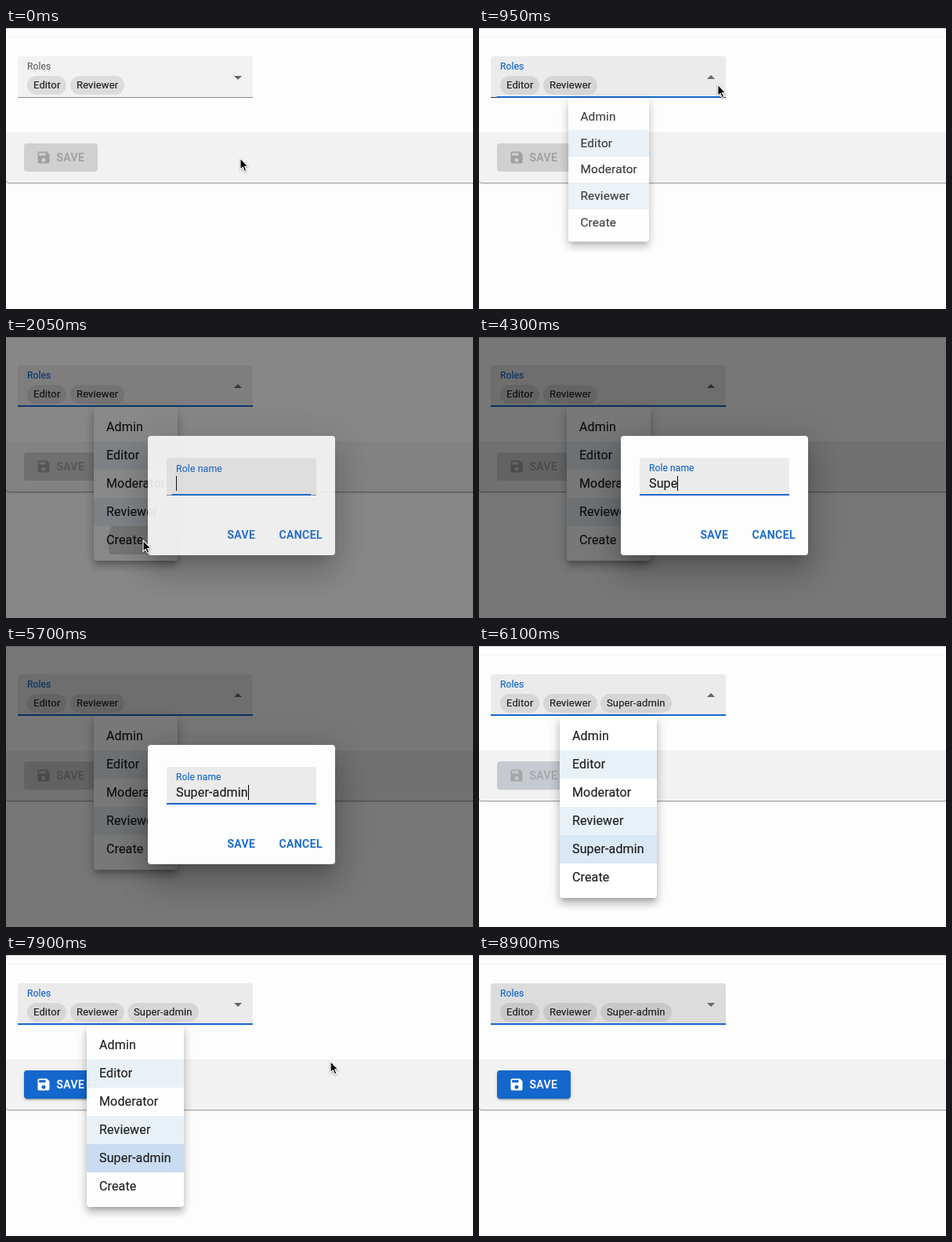
An HTML page for the animation above (9550 ms loop, 596 by 358 pixels).

```html
<!DOCTYPE html>
<html lang="en">
<head>
<meta charset="utf-8">
<title>Roles form</title>
<style>
  html, body { margin: 0; width: 100%; height: 100%; overflow: hidden; background: #fdfdfd; }
  body { font: 16px Roboto, sans-serif; color: #202020; cursor: default; }
  #stage { position: absolute; left: 0; top: 0; width: 596px; height: 358px; overflow: hidden; background: #fdfdfd;
    --blue: #1467cc; -webkit-text-stroke: .2px; }
  #stage div, #stage svg { position: absolute; box-sizing: border-box; white-space: nowrap; }
  .t { line-height: 20px; height: 20px; }
  .small { font-size: 12px; letter-spacing: .11px; }
  .btn { font-size: 14px; font-weight: 500; letter-spacing: .4px; }
  #topline { left: 0; top: 0; width: 596px; height: 1px; background: #d2d2d2; }
  #faint { left: 0; top: 11px; width: 596px; height: 1px; background: #f5f5f5; }
  #footer { left: 0; top: 133px; width: 610px; height: 64px; background: #f2f2f2; border-radius: 0 0 0 4px;
    box-shadow: 0 1px 0 #a2a2a2, 0 2px 2px rgba(0,0,0,.1); }
  #select { left: 15px; top: 36px; width: 300px; height: 53px; border-radius: 4px 4px 0 0; }
  #rule { left: 0; top: 52px; width: 300px; height: 1px; }
  #focusRule { left: 0; top: 51px; width: 300px; height: 2px; background: var(--blue); }
  #stage .chip { top: 25px; height: 24px; border-radius: 12px; background: rgba(0,0,0,.09); padding: 0 8px;
    font-size: 13px; line-height: 24px; letter-spacing: .12px; }
  #arrow { left: 269px; top: 15px; width: 24px; height: 24px; fill: #666; }
  #save { left: 23px; top: 147px; width: 94px; height: 36px; border-radius: 4px; }
  #save svg { left: 15px; top: 8px; width: 20px; height: 20px; fill: currentColor; }
  #save .t { left: 41.5px; top: 8px; }
  #menu { top: 89px; padding: 8px 0; border-radius: 4px; background: #fff; transform-origin: 50% 0;
    box-shadow: 0 5px 5px -3px rgba(0,0,0,.2), 0 8px 10px 1px rgba(0,0,0,.14), 0 3px 14px 2px rgba(0,0,0,.12); }
  #stage #menu .row { position: relative; height: 36px; line-height: 36px; padding-left: 16px; letter-spacing: .15px; overflow: hidden; }
  #menu .on { background: #e9f1f8; }
  #ripple { border-radius: 50%; background: #000; }
  #shade { left: 0; top: 0; width: 596px; height: 358px; background: rgba(0,0,0,.53); }
  #dialog { left: 181px; top: 126px; width: 239px; height: 152px; border-radius: 4px; background: #fdfdfd;
    box-shadow: 0 11px 15px -7px rgba(0,0,0,.2), 0 24px 38px 3px rgba(0,0,0,.14), 0 9px 46px 8px rgba(0,0,0,.12); }
  #field { left: 24px; top: 28px; width: 191px; height: 48px; border-radius: 4px 4px 0 0; background: #ebebeb; }
  #fieldRule { left: 0; top: 47px; width: 191px; height: 1px; background: #8a8a8a; }
  #fieldFocus { left: 0; top: 46px; width: 191px; height: 2px; background: var(--blue); }
  #name { left: 12px; letter-spacing: .15px; transform-origin: 0 50%; }
  #typed { left: 12px; top: 23px; letter-spacing: .15px; }
  #caret { top: 23px; width: 1px; height: 19px; background: #000; }
  #dialog .btn { top: 116px; color: var(--blue); }
  #cursor { left: 0; top: 0; width: 20px; height: 24px; overflow: visible; filter: drop-shadow(0 1px 1px rgba(0,0,0,.35)); }
</style>
</head>
<body>
<div id="stage">
  <div id="topline"></div>
  <div id="faint"></div>
  <div id="footer"></div>
  <div id="select">
    <div id="label" class="t small" style="left:12px;top:3px">Roles</div>
    <div class="chip" style="left:12px">Editor</div>
    <div class="chip" style="left:67px">Reviewer</div>
    <div class="chip" id="newChip" style="left:140px">Super-admin</div>
    <svg id="arrow" viewBox="0 0 24 24"><path d="M7 10l5 5 5-5z"/></svg>
    <div id="rule"></div>
    <div id="focusRule"></div>
  </div>
  <div id="save">
    <svg viewBox="0 0 24 24"><path d="M17 3H5c-1.11 0-2 .9-2 2v14c0 1.1.89 2 2 2h14c1.1 0 2-.9 2-2V7l-4-4zm-5 16c-1.66 0-3-1.34-3-3s1.34-3 3-3 3 1.34 3 3-1.34 3-3 3zm3-10H5V5h10v4z"/></svg>
    <div class="t btn">SAVE</div>
  </div>
  <div id="menu">
    <div class="row">Admin</div>
    <div class="row on">Editor</div>
    <div class="row">Moderator</div>
    <div class="row on">Reviewer</div>
    <div class="row" id="newRow">Super-admin</div>
    <div class="row">Create<div id="ripple"></div></div>
  </div>
  <div id="modal" style="left:0;top:0">
    <div id="shade"></div>
    <div id="dialog">
      <div id="field">
        <div id="name" class="t">Role name</div>
        <div id="typed" class="t"></div>
        <div id="caret"></div>
        <div id="fieldRule"></div>
        <div id="fieldFocus"></div>
      </div>
      <div class="t btn" style="left:101.5px">SAVE</div>
      <div class="t btn" style="left:167.5px">CANCEL</div>
    </div>
  </div>
  <svg id="cursor" viewBox="0 0 20 24">
    <path d="M0 0V14.2L3.2 11.2 5.4 16.4 7.8 15.4 5.6 10.3H10Z" fill="#000" stroke="#fff" stroke-width="1.1"/>
  </svg>
</div>
<script>
const LOOP = 9550;
const el = {};
document.querySelectorAll('[id]').forEach(n => el[n.id] = n);

const clamp = x => Math.max(0, Math.min(1, x));
const mix = (a, b, p) => a + (b - a) * p;
const rgb = (a, b, p) => `rgb(${a.map((v, i) => Math.round(mix(v, b[i], p)))})`;
const grey = v => [v, v, v];
const BLUE = [20, 103, 204];

// cubic-bezier(x1, 0, .2, 1)
const bezier = x1 => x => {
  let lo = 0, hi = 1;
  for (let i = 0; i < 24; i++) {
    const u = (lo + hi) / 2;
    const bx = 3 * x1 * u * (1 - u) ** 2 + .6 * u * u * (1 - u) + u ** 3;
    if (bx < x) lo = u; else hi = u;
  }
  return x <= 0 ? 0 : x >= 1 ? 1 : 3 * lo * lo * (1 - lo) + lo ** 3;
};
const easeInOut = bezier(.4), easeOut = bezier(0);
const span = (t, start, length, ease = easeInOut) => ease(clamp((t - start) / length));

const WORD = 'Super-admin';
const KEYS = [3200, 3550, 3900, 4300, 4450, 4700, 4900, 5150, 5300, 5650, 5700];
const ADDED = 6100;

// time, x, y of the pointer tip
const PATH = [
  [0, 299, 166], [50, 299, 166], [350, 304, 110], [650, 305, 72], [950, 305, 72],
  [1350, 243, 168], [1750, 175, 259], [6850, 175, 259], [7200, 332, 170],
  [7550, 408, 148], [7880, 410, 145], [8250, 483, -22], [LOOP, 483, -22]
];

function pointer(t) {
  const i = Math.max(1, PATH.findIndex(k => k[0] > t));
  const [t0, x0, y0] = PATH[i - 1], [t1, x1, y1] = PATH[i];
  const p = (t - t0) / (t1 - t0);
  return [mix(x0, x1, p), mix(y0, y1, p)];
}

function drawPage(t, added) {
  const hover = span(t, 480, 200), focus = span(t, 810, 200, easeOut);
  const back = span(t, 7920, 200);
  el.select.style.background = rgb(grey(mix(242, 235, hover)), grey(220), back);
  el.rule.style.background = rgb(grey(134), grey(40), hover);
  el.focusRule.style.transform = `scaleX(${focus})`;
  el.label.style.color = rgb(grey(102), BLUE, focus);
  el.newChip.style.display = added ? '' : 'none';
  el.arrow.style.transform = t >= 825 && t < 7900 ? 'rotate(180deg)' : '';

  const live = added ? span(t, 6065, 250) : 0;
  el.save.style.background = rgb(grey(208), BLUE, live);
  el.save.style.color = rgb(grey(160), grey(255), live);
  el.save.style.boxShadow = `0 3px 1px -2px rgba(0,0,0,${.2 * live}), 0 2px 2px rgba(0,0,0,${.14 * live}), 0 1px 5px rgba(0,0,0,${.12 * live})`;
}

function drawMenu(t, added) {
  const closing = t >= 7900;
  const open = closing ? 1 - span(t, 7890, 210) : span(t, 820, 230);
  const grow = closing ? 1 - span(t, 7960, 140) : open;
  const s = el.menu.style;
  s.display = open > 0 ? '' : 'none';
  s.left = (added ? 103 : 112) + 'px';
  s.width = (added ? 124 : 107) + 'px';
  s.opacity = open;
  s.transform = grow < 1 ? `scale(${mix(.75, 1, grow)}, ${mix(.5625, 1, grow)})` : '';
  el.newRow.style.display = added ? '' : 'none';
  el.newRow.style.background = rgb([233, 241, 248], [201, 220, 241], span(t, 6050, 150));

  const r = 67 * span(t, 1815, 550), rs = el.ripple.style;
  rs.left = 63 - r + 'px';
  rs.top = 20 - r + 'px';
  rs.width = rs.height = 2 * r + 'px';
  rs.opacity = .24 * (1 - span(t, 1950, 330));
}

function drawDialog(t, added) {
  const shown = added ? 0 : span(t, 1915, 225);
  el.modal.style.display = shown > 0 ? '' : 'none';
  el.shade.style.opacity = el.dialog.style.opacity = shown;
  const lift = span(t, 1920, 200, easeOut);
  el.fieldFocus.style.transform = `scaleX(${lift})`;
  el.name.style.top = mix(14, 3, lift) + 'px';
  el.name.style.transform = `scale(${mix(1, .75, lift)})`;
  el.name.style.color = rgb(grey(110), BLUE, lift);
  el.typed.textContent = WORD.slice(0, KEYS.filter(k => k <= t).length);
  el.caret.style.left = 12 + el.typed.offsetWidth + 'px';
  el.caret.style.opacity = t < 2000 || (t >= 2450 && t < 2900) ? 0 : 1;
}

function draw(t) {
  const added = t >= ADDED;
  drawPage(t, added);
  drawMenu(t, added);
  drawDialog(t, added);
  const [x, y] = pointer(t);
  el.cursor.style.transform = `translate(${x}px, ${y}px)`;
  el.cursor.style.display = t >= KEYS[0] && t < 6900 ? 'none' : '';
}

const begin = performance.now();
function tick() {
  draw((performance.now() - begin) % LOOP);
  requestAnimationFrame(tick);
}
tick();
</script>
</body>
</html>
```
